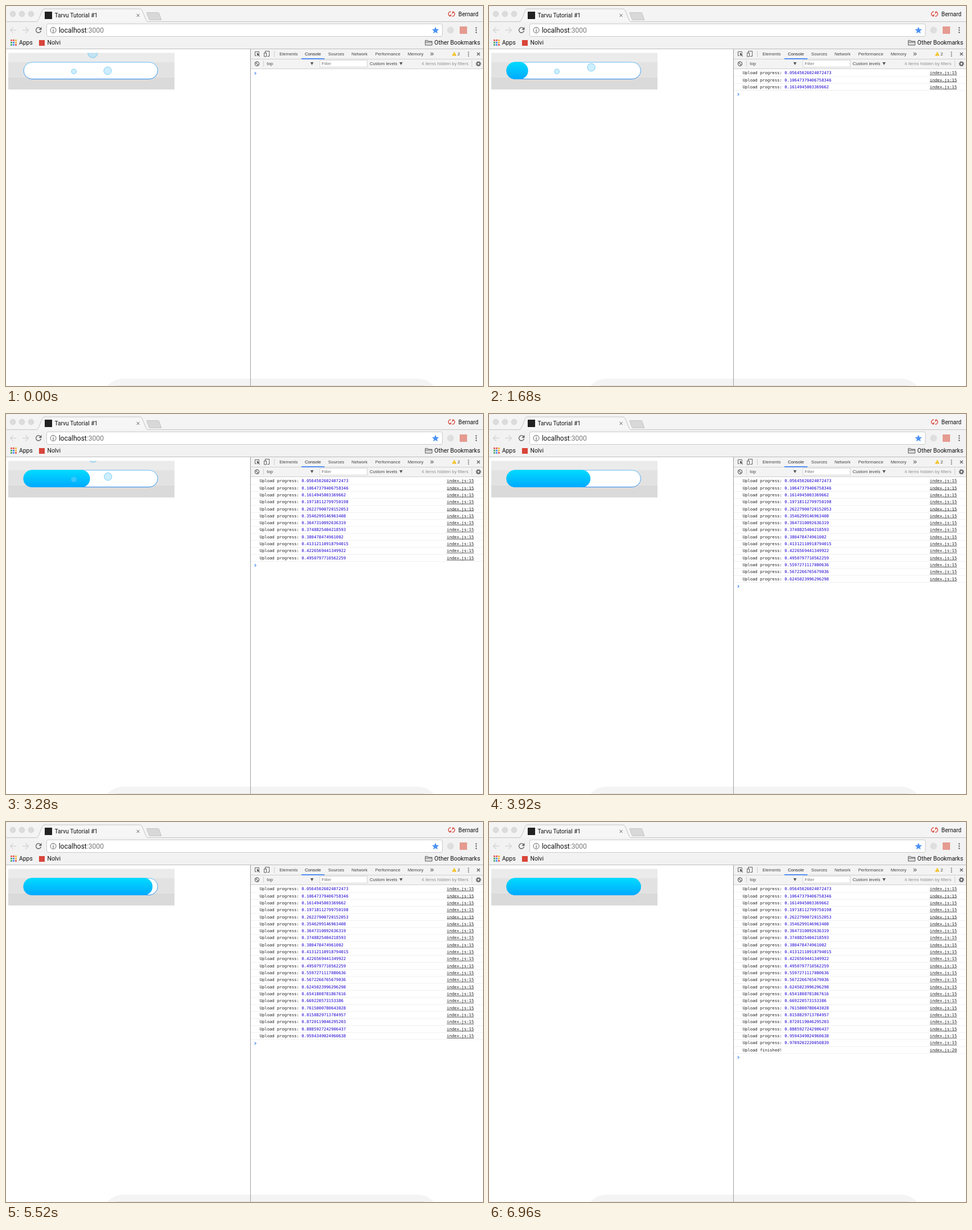
An HTML page for the animation above (7.2 s loop, 838 by 669 pixels).

```html
<!DOCTYPE html>
<html lang="en">
<head>
<meta charset="utf-8">
<title>Upload progress</title>
<style>
  html, body { margin: 0; width: 100%; height: 100%; overflow: hidden; background: #fff; }
  svg { display: block; }
  text { white-space: pre; }
  .ui { font: 10.4px Roboto, sans-serif; fill: #111; }
  .tools { font: 7.7px "Liberation Sans", Arial, sans-serif; fill: #444; }
  .log { font: 7.2px "DejaVu Sans Mono", monospace; fill: #222; }
  .line { fill: none; stroke: #5f5f5f; }
</style>
</head>
<body>
<svg width="838" height="669" viewBox="0 0 838 669">
  <defs>
    <linearGradient id="water" x2="0" y2="1"><stop stop-color="#00dbff"/><stop offset="1" stop-color="#00a9ff"/></linearGradient>
    <linearGradient id="rim" x2="0" y2="1"><stop stop-color="#62bcfa"/><stop offset="1" stop-color="#2b8cec"/></linearGradient>
    <clipPath id="page"><path d="M4 82.5h292v64.5h-292z"/></clipPath>
  </defs>

  <!-- window frame -->
  <path fill="#f4f4f4" d="M0 0h838v76H0z"/>
  <path fill="#f2f2f2" d="M0 28h838v47H0z"/>
  <g fill="#dcdcdc" stroke="#d0d0d0"><circle cx="12" cy="14" r="4.7"/><circle cx="28" cy="14" r="4.7"/><circle cx="44" cy="14" r="4.7"/></g>
  <path fill="#f6f6f6" stroke="#c4c4c4" d="M0 27.5H53q3 0 4-3l7-17q1-2.500 4-2.500H235q3 0 4 2.500l7 17q1 3 4 3H838"/>
  <path fill="#d8d8d8" stroke="#c6c6c6" stroke-linejoin="round" d="M247 11.500h20q1.500 0 2 1.500l4 11.500h-20q-1.500 0-2-1.500z"/>
  <path fill="#222" d="M68 10h13v13H68z"/>
  <path class="line" d="M229.500 14l5 5m0-5l-5 5"/>
  <g class="line" style="stroke:#d9473c" stroke-width="1.400"><path d="M781.500 10a4 4 0 0 0-.5 8m-2-1h2.500v-2.500M784 18a4 4 0 0 0 .5-8m2.500 1h-2.500v2.500"/></g>
  <g class="ui">
    <text x="85.500" y="20" font-size="10.1" style="font-size:10.1px">Tarvu Tutorial #1</text>
    <text x="830" y="18" text-anchor="end" style="font-size:10.1px">Bernard</text>
  </g>

  <!-- address bar -->
  <g class="line" style="stroke:#d4d4d4" stroke-width="1.300">
    <path d="M18 42.500H7.500m5-5l-5 5 5 5M29 42.500h10.500m-5-5l5 5-5 5"/>
    <path stroke="#5f5f5f" style="stroke:#5f5f5f" d="M60.500 39.500a4.500 4.500 0 1 0 1 4"/>
  </g>
  <path fill="#5f5f5f" d="M62.500 37v5h-5z"/>
  <rect x="71.500" y="31.500" width="695" height="22" rx="2.500" fill="#fff" stroke="#cbcbcb"/>
  <circle class="line" cx="83" cy="42.500" r="5"/>
  <path class="line" stroke-width="1.200" d="M83 39.500v1.200m0 1v4"/>
  <text class="ui" x="92.700" y="47" style="font-size:12px">localhost<tspan fill="#777">:3000</tspan></text>
  <path fill="#4b92f2" d="M754.500 36.500l1.700 4.200 4.500.3-3.500 2.900 1.100 4.400-3.800-2.400-3.800 2.400 1.100-4.400-3.500-2.900 4.500-.3z"/>
  <circle cx="781" cy="42.500" r="6" fill="#dedede"/>
  <path fill="#e59a90" d="M797 36h13v13h-13z"/>
  <g fill="#666"><circle cx="826" cy="38.500" r="1.200"/><circle cx="826" cy="42.500" r="1.200"/><circle cx="826" cy="46.500" r="1.200"/></g>

  <!-- bookmarks -->
  <g id="apps"></g>
  <path fill="#d8453a" d="M58 60h10v10H58z"/>
  <path fill="#d8d8d8" stroke="#666" d="M736.500 69V60.500h4.500l1 1.500h6.500v7zm0-5.500h12"/>
  <g class="ui"><text x="23" y="68">Apps</text><text x="72.500" y="68">Nolvi</text><text x="833" y="68" text-anchor="end">Other Bookmarks</text></g>
  <path stroke="#bdbdbd" d="M0 75.500h838"/>

  <!-- page -->
  <g clip-path="url(#page)">
    <path fill="#ebebeb" d="M4 82h292v17H4z"/>
    <path fill="#e2e2e2" d="M4 99h292v27H4z"/>
    <path fill="#dadada" d="M4 126h292v21H4z"/>
    <rect x="31" y="99" width="235.500" height="29.500" rx="14.700" fill="#fff" stroke="url(#rim)"/>
    <rect id="fill" x="30.500" y="98.500" width="0" height="30.500" rx="15" fill="url(#water)"/>
    <g id="bubbles" fill="rgba(130,215,252,.4)" stroke="rgba(90,190,242,.75)"></g>
  </g>
  <rect x="170" y="656" width="590" height="80" rx="36" fill="#f4f4f4"/>
  <path stroke="#e2e2e2" d="M195 668.500h540"/>

  <!-- developer tools -->
  <path fill="#f3f3f3" d="M430 76h408v34H430z"/>
  <path stroke="#cfcfcf" d="M430 93.500h408M430 110.500h408M471.500 79v11M452.500 96v11M818.500 96v11"/>
  <path stroke="#a0a0a0" d="M429.500 76v593"/>
  <path fill="#4285f4" d="M519 92h40.500v1.700H519z"/>
  <path class="line" d="M440 87.500h-2.500v-7h7v2.500M455.500 80v-.5h7v4M455.500 79.500v4"/>
  <path fill="#555" d="M440.500 82.500l5.500 2.300-2.300.9 2.300 2.400-.9.900-2.400-2.400-.9 2.200z"/>
  <path class="line" d="M453.500 82.500h4v6.500h-4zM459 88.500h3.500v-5"/>
  <path class="line" d="M827.500 82l5 5m0-5l-5 5" stroke-width="1.200"/>
  <g fill="#666"><circle cx="812.500" cy="81.500" r="1"/><circle cx="812.500" cy="84.700" r="1"/><circle cx="812.500" cy="87.900" r="1"/></g>
  <path fill="#f3b900" d="M787.500 80.500l3.800 7h-7.600z"/>
  <path stroke="#fff" stroke-width=".8" d="M787.500 83v2.200m0 .7v.8"/>
  <circle class="line" cx="441" cy="101.800" r="3.600" stroke-width="1.200"/><path class="line" stroke-width="1.200" d="M438.500 99.300l5 5"/>
  <path fill="#555" d="M534.700 99h5.600l-2.800 5zM691.200 99h5.600l-2.800 5z"/>
  <rect x="551.500" y="95.500" width="83" height="12" fill="#fff" stroke="#d6d6d6"/>
  <circle class="line" cx="830" cy="101.800" r="2.600" stroke-width="1.800"/>
  <circle class="line" cx="830" cy="101.800" r="4" stroke-width="1.300" stroke-dasharray="1.570"/>
  <g class="tools">
    <text x="480.500" y="87">Elements</text><text x="525" y="87" fill="#222">Console</text>
    <text x="566" y="87">Sources</text><text x="607" y="87">Network</text>
    <text x="648.700" y="87">Performance</text><text x="705.700" y="87">Memory</text>
    <text x="745" y="88" style="font-size:12px">»</text><text x="793.300" y="87">2</text>
    <text x="458.300" y="104.300">top</text><text x="554.500" y="104.300" style="fill:#777">Filter</text>
    <text x="639" y="104.300">Custom levels</text>
    <text x="812.500" y="104.300" text-anchor="end" style="fill:#909090;font-size:7.85px">4 items hidden by filters</text>
  </g>
  <g id="rows" class="log"></g>
  <path id="prompt" fill="none" stroke="#3f82ea" stroke-width="1.100" d="M436.800 116.300l2.400 2.200-2.400 2.200"/>
</svg>
<script>
const LOOP = 7200, STEP = 80, PITCH = 12.33;
const CYCLE = 810, CYCLE_START = 740;

// Each log entry: time in ms, reported progress
const entries = [
  [720, "0.05645026024072473"], [1440, "0.10647379406758346"], [1600, "0.1614945003369662"],
  [1840, "0.19718112799750198"], [2160, "0.26227900720152053"], [2320, "0.3546299146963408"],
  [2720, "0.3647310092636319"], [2800, "0.3748825404218593"], [2800, "0.380478474961002"],
  [2880, "0.41312110918794015"], [2960, "0.4226569441349922"], [3280, "0.4950797710562259"],
  [3440, "0.5597271117080636"], [3600, "0.5672266765679036"], [3920, "0.6245023996296298"],
  [4160, "0.6541808781867616"], [4320, "0.669220573153386"], [4480, "0.7615000780643028"],
  [4800, "0.8158829713784957"], [5040, "0.8720119046295203"], [5200, "0.8885927242906437"],
  [5520, "0.9594349024960638"], [5760, "0.9709202220050839"], [6000, ""]
];

// Bubbles wait until `start`, then rise; speeds in px per ms
const bubbles = [
  { x: 151.2, y: 93.5, r: 8.5, start: 0, rise: .155, drift: .016 },
  { x: 178.5, y: 114, r: 6.7, start: 77, rise: .113, drift: .022 },
  { x: 119.2, y: 115.2, r: 4.3, start: 285, rise: .17, drift: .01 }
];

const $ = id => document.getElementById(id);
function add(parent, tag, attrs, html = "") {
  const el = document.createElementNS("http://www.w3.org/2000/svg", tag);
  for (const key in attrs) el.setAttribute(key, attrs[key]);
  el.innerHTML = html;
  return parent.appendChild(el);
}

const appColors = ["#e5534b", "#e5534b", "#eeb52c", "#4aa564", "#4a8af4", "#eeb52c", "#4aa564", "#4a8af4", "#e5534b"];
appColors.forEach((fill, i) =>
  add($("apps"), "rect", { x: 8 + i % 3 * 4, y: 59 + Math.floor(i / 3) * 4, width: 2.8, height: 2.8, fill }));

const rows = entries.map(([, value], i) => {
  const row = add($("rows"), "g", { transform: `translate(0 ${i * PITCH})` });
  add(row, "path", { d: "M430 124h408", stroke: "#f0f0f0" });
  add(row, "text", { x: 445.7, y: 120.2 },
    value ? `Upload progress: <tspan fill="#1c00cf">${value}</tspan>` : "Upload finished!");
  add(row, "text", { x: 822, y: 120.2, "text-anchor": "end", "text-decoration": "underline" },
    `index.js:${value ? 15 : 20}`);
  return row;
});

const dots = bubbles.map(b => add($("bubbles"), "circle", { r: b.r }));

function draw(t) {
  const count = entries.filter(([time]) => time <= t).length;
  rows.forEach((row, i) => row.setAttribute("visibility", i < count ? "visible" : "hidden"));
  $("prompt").setAttribute("transform", `translate(0 ${count * PITCH})`);
  const progress = count ? +(entries[count - 1][1] || 1) : 0;
  $("fill").setAttribute("width", 236.5 * progress);

  const phase = (t - CYCLE_START + CYCLE) % CYCLE;
  const visible = t >= CYCLE_START - CYCLE && phase >= 0 && phase < 510;
  $("bubbles").setAttribute("visibility", visible ? "visible" : "hidden");
  bubbles.forEach((b, i) => {
    const moved = Math.max(0, phase - b.start);
    dots[i].setAttribute("cx", b.x + b.drift * moved);
    dots[i].setAttribute("cy", b.y - b.rise * moved);
  });
}

const began = performance.now();
function tick() {
  const t = (performance.now() - began) % LOOP;
  draw(Math.floor(t / STEP) * STEP);
  requestAnimationFrame(tick);
}
tick();
</script>
</body>
</html>
```
